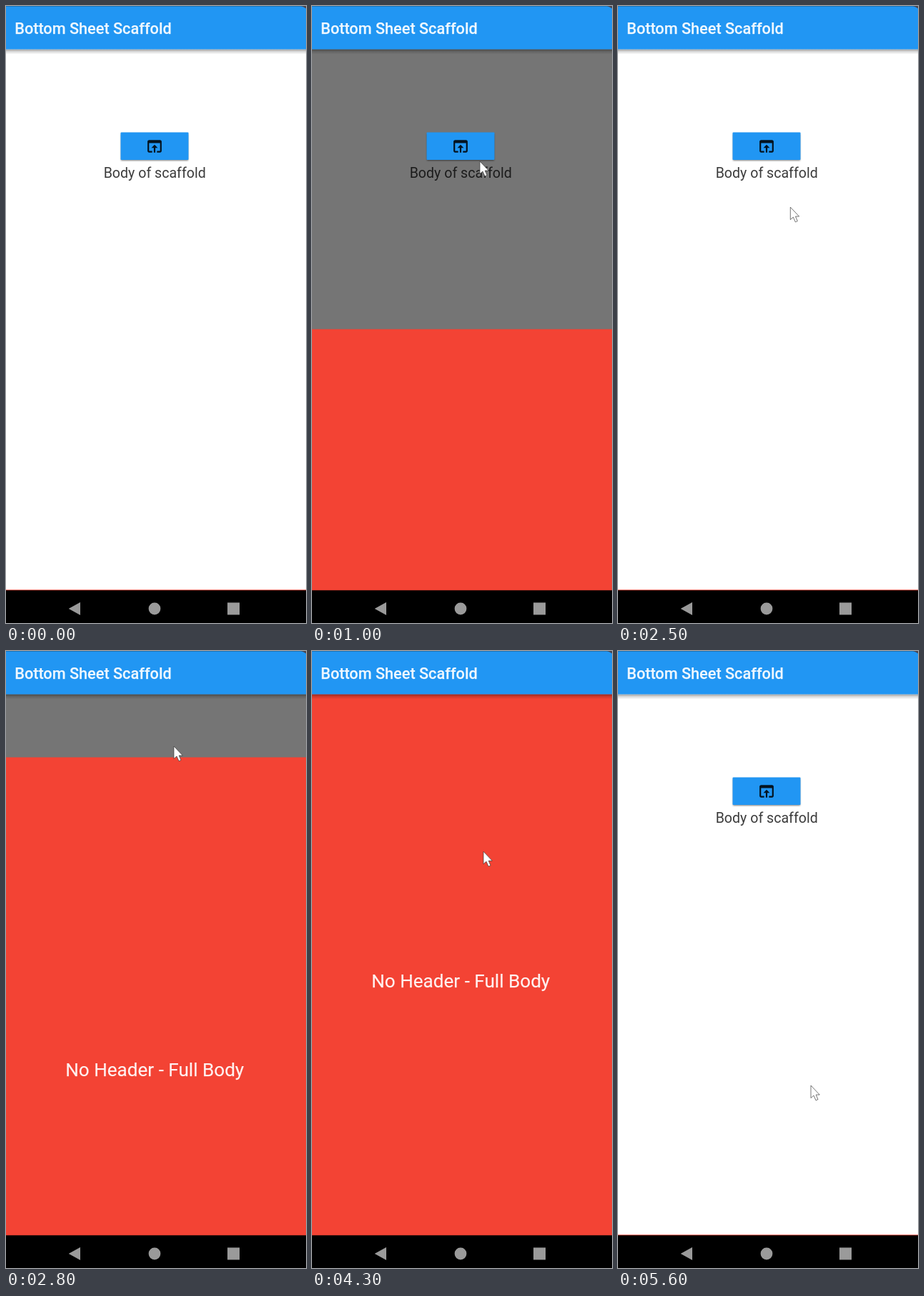
Animation, 420 px wide and 862 px high, one loop 5.7 s. Source, as an HTML page:

```html
<!DOCTYPE html>
<html lang="en">
<head>
<meta charset="utf-8">
<title>Bottom Sheet Scaffold</title>
<style>
  html, body { margin: 0; width: 100%; height: 100%; overflow: hidden; background: #fff; }
  svg { display: block; width: 100%; height: 100%; }
  text { font-family: Roboto, sans-serif; }
  .label { text-anchor: middle; }
  .light { fill: #fff; fill-opacity: .93; stroke: #fff; stroke-width: .25; stroke-opacity: .6; }
</style>
</head>
<body>
<svg viewBox="0 0 420 862">
  <defs>
    <linearGradient id="shade" x2="0" y2="1">
      <stop offset="0" stop-opacity=".38"/>
      <stop offset=".45" stop-opacity=".15"/>
      <stop offset="1" stop-opacity="0"/>
    </linearGradient>
    <filter id="soft" x="-10%" y="-20%" width="120%" height="150%">
      <feGaussianBlur stdDeviation="1.2"/>
    </filter>
  </defs>

  <rect id="page" width="420" height="862" fill="#fff"/>

  <rect x="161" y="178.5" width="94" height="37.5" opacity=".5" filter="url(#soft)"/>
  <rect x="160.5" y="176.5" width="95" height="38.5" rx="1" fill="#2196f3"/>
  <path transform="translate(194.8 182.8) scale(1.1)" opacity=".87"
    d="M19 4H5c-1.1 0-2 .9-2 2v12c0 1.1.9 2 2 2h4v-2H5V8h14v10h-4v2h4c1.1 0 2-.9 2-2V6c0-1.1-.9-2-2-2zm-7 6l-4 4h3v6h2v-6h3z"/>
  <text class="label" x="208.2" y="240" font-size="19.6" fill-opacity=".77">Body of scaffold</text>

  <g id="sheet">
    <rect y="-.5" width="420" height="873" fill="#f34334"/>
    <text class="label light" x="208.2" y="445" font-size="26.1">No Header - Full Body</text>
  </g>

  <rect y="60.5" width="420" height="7" fill="url(#shade)"/>
  <rect width="420" height="60.5" fill="#2196f3"/>
  <rect width="420" height="1" fill="#1c74b8"/>
  <path d="M413 0H420V3.5Q417 1 413 0Z" fill="#4a4650"/>
  <text class="light" x="12.2" y="39" font-size="21.7" font-weight="500">Bottom Sheet Scaffold</text>

  <rect y="816.3" width="420" height="46"/>
  <g fill="#9a9a9a">
    <path d="M87.7 842L104 833V851Z"/>
    <circle cx="208" cy="842" r="8.4"/>
    <rect x="310" y="833.5" width="17" height="17"/>
  </g>

  <path id="cursor" d="M0 0V17.5L4 14L7 20.8L10 19.5L7.2 13H12.3Z" fill="#fff" stroke="#333" stroke-opacity=".75" stroke-width=".9"/>
</svg>
<script>
  const LOOP = 5700, STEP = 100, CLOSED = 816, OPENED = -56;
  const RISE = 400, FALL = 200, APPEAR = 600;
  const [page, sheet, cursor] = ["page", "sheet", "cursor"].map(id => document.getElementById(id));

  // Each round: the sheet rises, is dragged down to its lip, then falls shut.
  const rounds = [
    { leave: APPEAR, reach: 900, rise: 822, grab: 1200, drop: 1900, lip: 361, from: [262, 320], tap: [235, 217], end: [251, 509] },
    { leave: 2100, reach: 2800, rise: 2526, grab: 3300, drop: 4900, lip: 320, from: [251, 509], tap: [235, 133], end: [281, 637] }
  ];
  const exit = { start: 5100, end: 5500, at: [270, 607] };

  const mix = (a, b, p) => a + (b - a) * p;
  const span = (t, a, b) => Math.min(1, Math.max(0, (t - a) / (b - a)));
  const smooth = p => p * p * (3 - 2 * p);

  function sheetTop(t, r) {
    if (t >= r.drop) return mix(r.lip, CLOSED, span(t, r.drop, r.drop + FALL));
    const pull = mix(r.grab, r.drop, .375);
    if (t >= pull) return mix(OPENED, r.lip, span(t, pull, r.drop) ** 1.675);
    return mix(CLOSED, OPENED, smooth(span(t, r.rise, r.rise + RISE)));
  }

  function pointer(t, r) {
    const move = (a, b, px, py) => [mix(a[0], b[0], px), mix(a[1], b[1], py)];
    if (t < r.grab) {
      const p = smooth(span(t, r.leave, r.reach));
      return move(r.from, r.tap, p, p);
    }
    if (t < exit.start) {
      const p = span(t, r.grab, r.drop) ** 2.62;
      return move(r.tap, r.end, p ** 1.8, p);
    }
    const p = smooth(span(t, exit.start, exit.end));
    return move(r.end, exit.at, p, p);
  }

  function draw(ms) {
    const t = Math.floor((ms % LOOP) / STEP) * STEP;
    const round = rounds[t < rounds[1].leave ? 0 : 1];
    const top = sheetTop(t, round);
    const [x, y] = pointer(t, round);
    const dimmed = t < round.grab ? t > round.rise : top < 340;
    page.setAttribute("fill", dimmed ? "#757575" : "#fff");
    sheet.setAttribute("transform", `translate(0 ${Math.round(top)})`);
    cursor.setAttribute("transform", `translate(${x} ${y})`);
    cursor.setAttribute("visibility", t >= APPEAR ? "visible" : "hidden");
  }

  const start = performance.now();
  function tick() {
    draw(performance.now() - start);
    requestAnimationFrame(tick);
  }
  tick();
</script>
</body>
</html>
```
